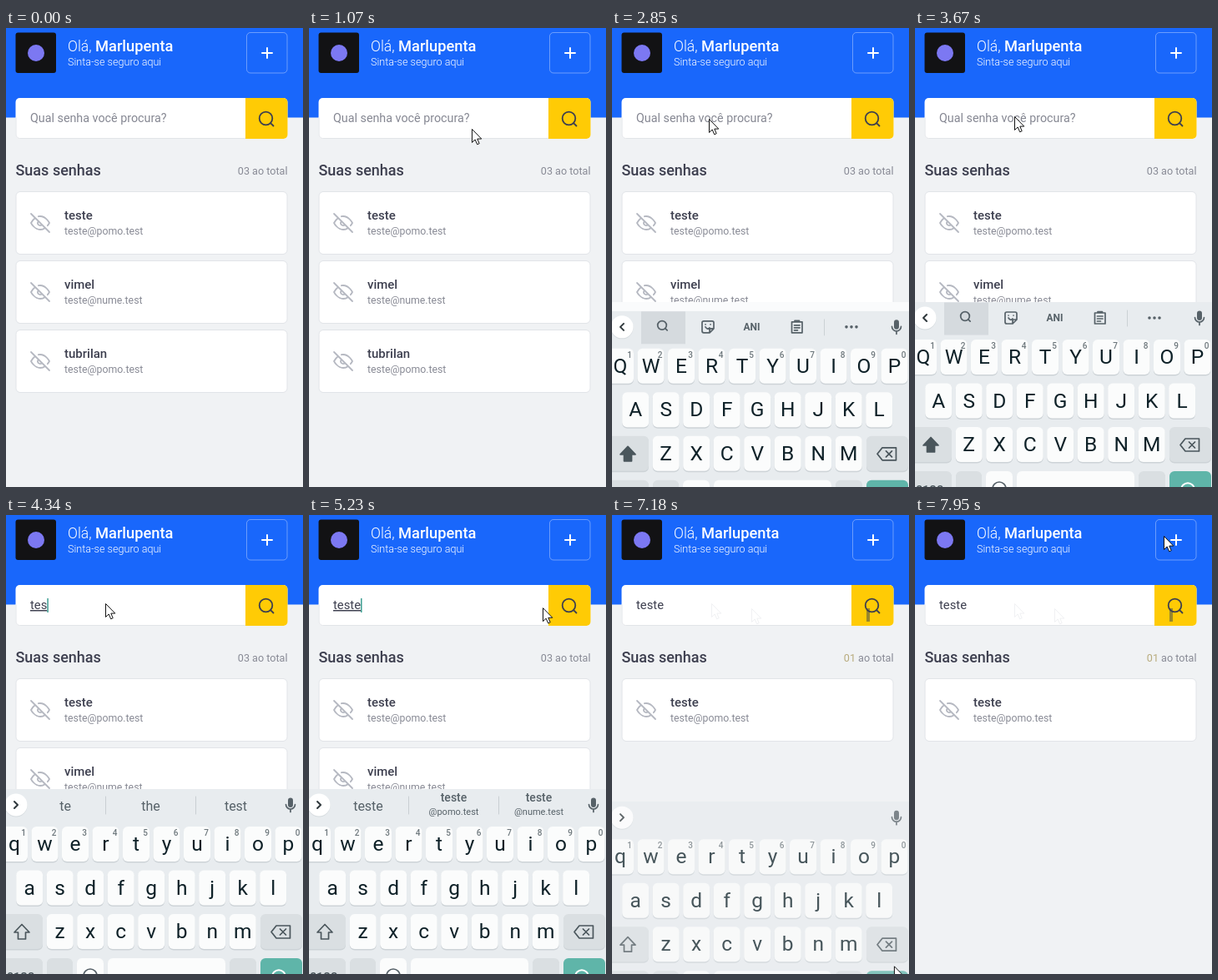
An HTML page for the animation above (8000 ms loop, 356 by 551 pixels).

```html
<!DOCTYPE html>
<html lang="pt">
<head>
<meta charset="utf-8">
<title>Senhas</title>
<style>
html, body { margin: 0; width: 100%; height: 100%; overflow: hidden; background: #f0f2f4; }
svg { display: block; width: 100%; height: 100%; }
text { font-family: Roboto, sans-serif; white-space: pre; }
.line { fill: none; stroke-linecap: round; stroke-linejoin: round; }
.mid { text-anchor: middle; }
.bold { font-weight: 500; }
.thin { font-weight: 300; }
#typed { text-decoration-color: #8d9097; text-decoration-thickness: 1px; }
</style>
</head>
<body>
<svg viewBox="0 0 356 551">
  <defs>
    <path id="arrow" d="M.5 .5V16.500L4.200 13L6.700 18.800L9.200 17.700L6.800 12.100H11.800Z"/>
    <g id="lens" class="line"><circle r="7.8"/><path d="M5.6 5.6L9 9"/></g>
  </defs>
  <rect width="356" height="551" fill="#f0f2f4"/>
  <rect width="356" height="107.500" fill="#1967fb"/>
  <rect x="11.500" y="5.500" width="48.500" height="48.500" rx="3" fill="#121214"/>
  <circle cx="36" cy="30" r="10" fill="#7c78f2"/>
  <g fill="#fff">
    <text x="74" y="28" font-size="17.6" class="thin">Olá,</text>
    <text x="107" y="28" font-size="18.3" class="bold">Marlupenta</text>
    <text x="74" y="45" font-size="12.6" class="thin">Sinta-se seguro aqui</text>
  </g>
  <rect x="288.5" y="5.5" width="48.5" height="48.5" rx="4.5" fill="none" stroke="#fff" stroke-opacity=".36"/>
  <path d="M307 30h12M313 24v12" stroke="#fff" stroke-width="2" class="line"/>
  <rect x="11.500" y="84" width="326" height="49" rx="5" fill="#fff"/>
  <path d="M12 107.500V128a4.500 4.500 0 0 0 4.500 4.500H287" fill="none" stroke="#e1e4e8"/>
  <path d="M287 84H332.500a5 5 0 0 1 5 5v39a5 5 0 0 1-5 5H287Z" fill="#ffcb05"/>
  <rect id="bar" x="305" y="112" width="4" height="16" fill="#98862c"/>
  <use href="#lens" x="311.500" y="108.500" stroke="#3d3f4f" stroke-width="1.800"/>
  <g id="ghosts" fill="#fff" stroke="#f0f1f3">
    <use href="#arrow" x="119" y="106"/><use href="#arrow" x="167" y="112"/>
  </g>
  <text id="hint" x="29" y="113" font-size="14.3" fill="#858792">Qual senha você procura?</text>
  <text id="typed" x="29" y="113" font-size="14.8" fill="#3d3f4f"></text>
  <rect id="caret" y="100" width="1.500" height="17" fill="#3d9e92"/>
  <text x="11.500" y="177" font-size="18" class="bold" fill="#3d3f4f">Suas senhas</text>
  <text x="337.500" y="175.500" font-size="12.6" text-anchor="end" fill="#888a95"><tspan id="count">03</tspan> ao total</text>
  <g id="cards"></g>
  <rect id="panel" y="329" width="356" height="222" fill="#fafbfc"/>
  <g id="board"></g>
  <use id="mouse" href="#arrow" fill="#fff" stroke="#111" stroke-linejoin="round"/>
</svg>
<script>
const $ = id => document.getElementById(id);
const NS = 'http://www.w3.org/2000/svg';

function add(parent, tag, attrs, text) {
  const el = document.createElementNS(NS, tag);
  for (const k in attrs) el.setAttribute(k, attrs[k]);
  if (text) el.textContent = text;
  parent.appendChild(el);
  return el;
}
const show = (el, on) => el.setAttribute('visibility', on ? 'visible' : 'hidden');

// Password cards
const EYE = 'M17.940 17.940A10.070 10.070 0 0 1 12 20c-7 0-11-8-11-8a18.450 18.450 0 0 1 5.060-5.940' +
  'M9.900 4.240A9.120 9.120 0 0 1 12 4c7 0 11 8 11 8a18.500 18.500 0 0 1-2.160 3.190' +
  'm-6.720-1.070a3 3 0 1 1-4.240-4.240M1 1l22 22';
const MAIL = '@pomo.test', MAIL2 = '@nume.test';
const cards = [['teste', MAIL], ['vimel', MAIL2], ['tubrilan', MAIL]].map(([name, mail], i) => {
  const g = add($('cards'), 'g', { transform: `translate(0 ${i * 83})` });
  add(g, 'rect', { x: 12, y: 196.5, width: 325, height: 75, rx: 5, fill: '#fff', stroke: '#e1e4e8' });
  add(g, 'path', { d: EYE, transform: 'translate(29 222)', class: 'line', stroke: '#b5b8c1', 'stroke-width': 1.8 });
  add(g, 'text', { x: 70, y: 229.5, 'font-size': 15, class: 'bold', fill: '#3d3f4f' }, name);
  add(g, 'text', { x: 70, y: 248, 'font-size': 12.3, fill: '#888a95' }, 'teste' + mail);
  return g;
});

// Keyboard
const board = $('board'), INK = '#0e2128', SOFT = '#566168', GRAY = '#dadfe2';
const letters = [];
add(board, 'rect', { y: 329, width: 356, height: 300, fill: '#e8ecef' });

function key(x, y, w, fill) {
  add(board, 'rect', { x, y: y + 1, width: w, height: 42.5, rx: 6, fill: '#cdd3d7' });
  add(board, 'rect', { x, y, width: w, height: 42, rx: 6, fill });
}
['qwertyuiop', 'asdfghjkl', 'zxcvbnm'].forEach((row, r) => {
  const y = 374 + r * 52.5;
  [...row].forEach((ch, i) => {
    const x = [10, 28.2, 64.7][r] + i * 36.5;
    key(x - 16, y, 32, '#fbfcfc');
    letters.push(add(board, 'text', { x, y: y + 29, 'font-size': 24.5, class: 'mid', fill: INK }, ch));
    if (!r) add(board, 'text', { x: x + 11, y: y + 11, 'font-size': 10, class: 'mid bold', fill: '#6d777c' }, String((i + 1) % 10));
  });
});
key(-6, 479, 50, GRAY);
key(305, 479, 50, GRAY);
[[-6, 50, GRAY], [49, 31, GRAY], [85, 32, '#fbfcfc'], [122, 141, '#fbfcfc'], [268, 32, GRAY], [305, 50, '#5fb5a9']]
  .forEach(([x, w, fill]) => key(x, 532, w, fill));

const icon = (parent, d, color = SOFT, width = 1.7, fill = 'none') =>
  add(parent, 'path', { d, stroke: color, 'stroke-width': width, class: 'line', style: 'fill:' + fill });
const shift = icon(board, 'M19 491.500l9 9.500h-4.500v8h-9v-8H10Z', '#4a565c');
icon(board, 'M318 500.500l6-7.500h16.500v15H324ZM328.500 497l7 7m0-7l-7 7', '#4a565c');
add(board, 'text', { x: 18, y: 560, 'font-size': 15, class: 'mid bold', fill: '#4a565c' }, '?123');
add(board, 'circle', { cx: 101, cy: 553, r: 8, class: 'line', stroke: SOFT, 'stroke-width': 1.7 });
add(board, 'use', { href: '#lens', x: 327, y: 554, stroke: '#fff', 'stroke-width': 2 });
add(board, 'rect', { x: 338, y: 339.5, width: 6, height: 11.5, rx: 3, fill: SOFT });
icon(board, 'M335.500 347.500a5.500 5.500 0 0 0 11 0M341 353.500v3');

// Toolbar with icons, and the strip of word suggestions
const tools = add(board, 'g'), words = add(board, 'g');
add(tools, 'rect', { x: 35, y: 329.5, width: 53, height: 39, fill: '#d5dade' });
add(tools, 'use', { href: '#lens', transform: 'translate(60 346) scale(.68)', stroke: SOFT, 'stroke-width': 2.6 });
icon(tools, 'M110 341h10q2 0 2 2v7l-5 5h-7q-2 0-2-2v-10q0-2 2-2ZM122 350h-3q-2 0-2 2v3M112 348q2.500 4 5 1M112 345h.1M118 345h.1');
add(tools, 'text', { x: 167.5, y: 352.3, 'font-size': 12, 'font-weight': 700, class: 'mid', fill: SOFT }, 'ANI');
icon(tools, 'M215.500 342h12.500v13h-12.500ZM219 342v-1.500h5.500v1.500M218.500 346h6.500M218.500 349h6.500M218.500 352h4');
icon(tools, 'M254.500 339v19', '#cbd1d5', 1);
[281, 287, 293].forEach(cx => add(tools, 'circle', { cx, cy: 348, r: 1.8, fill: SOFT }));
icon(words, 'M119.500 338v21M227.500 338v21', '#c9cfd3', 1);
const slots = [71, 173.5, 275.5].map(x => ({
  one: add(words, 'text', { x, y: 354.5, 'font-size': 16, class: 'mid', fill: SOFT }),
  top: add(words, 'text', { x, y: 343.5, 'font-size': 14, class: 'mid bold', fill: SOFT }),
  low: add(words, 'text', { x, y: 359.5, 'font-size': 11, class: 'mid', fill: SOFT })
}));
add(board, 'circle', { cx: 12, cy: 349, r: 13.5, fill: '#d5dade' });
add(board, 'circle', { cx: 12, cy: 348, r: 13.5, fill: '#fff' });
const chevron = icon(board, '', '#30393d', 2);

// Timeline
const TYPED = [[0, ''], [3940, 't'], [4140, 'te'], [4320, 'tes'], [4600, 'test'], [4810, 'teste']];
const HINTS = [[0, 't', 'the', 'to'], [4140, 'te', 'the', 'test'], [4480, 'tes', 'test', 'yes'],
  [4650, 'test', 'teste', 'tests'], [4860, 'teste', 'teste|' + MAIL, 'teste|' + MAIL2]];
const CARET = [[1970, 2440], [2920, 3470], [3940, 5800], [6290, 6770]];
const PATH = [[160, 343, 545], [370, 280, 330], [580, 150, 110], [700, 95, 54], [820, 130, 80], [1000, 212, 124],
  [1070, 195, 121], [1290, 183, 116], [1490, 183, 116], [1970, 154, 111], [2300, 154, 111], [2440, 116, 109],
  [3640, 116, 109], [3670, 119, 106], [4960, 119, 106], [5100, 167, 112], [5260, 305, 111], [5600, 305, 111],
  [5800, 338, 190], [6010, 341, 272], [6290, 335, 460], [6560, 335, 460], [6770, 337, 535], [7180, 338, 542],
  [7400, 325, 400], [7600, 272, 120], [7740, 256, 42], [7950, 298, 25]];

const last = (list, t) => list.filter(e => e[0] <= t).pop();

function along(path, t) {
  const i = path.findIndex(p => p[0] > t);
  if (i < 0) return path[path.length - 1].slice(1);
  if (!i) return path[0].slice(1);
  const a = path[i - 1], b = path[i], k = (t - a[0]) / (b[0] - a[0]);
  return [1, 2].map(n => a[n] + (b[n] - a[n]) * k);
}

function drawBoard(t) {
  const on = t >= 2640 && t < 7320;
  board.setAttribute('display', on ? 'inline' : 'none');
  show($('panel'), t >= 2640 && t < 2920);
  if (!on) return;
  let dy = 0, alpha = 1;
  if (t < 2920) {
    const left = (2920 - t) / 70;
    dy = 11 * left;
    alpha = Math.min(1, 1.3 - left * .25);
  } else if (t > 7040) {
    const u = (t - 7040) / 140;
    dy = 15 * u ** 1.5;
    alpha = 1 - .25 * u * u;
  }
  board.setAttribute('transform', `translate(0 ${dy})`);
  board.setAttribute('opacity', alpha);

  const caps = t < 3940, bare = t >= 7040;
  letters.forEach(el => {
    el.textContent = caps ? el.textContent.toUpperCase() : el.textContent.toLowerCase();
  });
  shift.style.fill = caps ? '#4a565c' : 'none';
  tools.setAttribute('display', caps ? 'inline' : 'none');
  words.setAttribute('display', caps || bare ? 'none' : 'inline');
  chevron.setAttribute('d', caps ? 'M14 344l-4 4l4 4' : 'M10 344l4 4l-4 4');
  const hints = last(HINTS, t);
  slots.forEach((s, i) => {
    const [a, b] = hints[i + 1].split('|');
    s.one.textContent = b ? '' : a;
    s.top.textContent = b ? a : '';
    s.low.textContent = b || '';
  });
}

function draw(t) {
  const word = last(TYPED, t)[1], found = t >= 5400;
  show($('hint'), !word);
  $('typed').textContent = word;
  $('typed').style.textDecorationLine = t < 7040 ? 'underline' : 'none';
  show($('caret'), CARET.some(([a, b]) => t >= a && t < b));
  $('caret').setAttribute('x', 29 + (word ? $('typed').getComputedTextLength() : 0));
  $('count').textContent = found ? '01' : '03';
  $('count').setAttribute('fill', found ? '#b8ab7c' : '#888a95');
  cards.forEach((c, i) => show(c, !i || !found));
  show($('ghosts'), t >= 5260);
  show($('bar'), t >= 5600);
  drawBoard(t);
  const [x, y] = along(PATH, t);
  show($('mouse'), t >= 160);
  $('mouse').setAttribute('transform', `translate(${x} ${y})`);
}

const start = performance.now();
function loop() {
  draw((performance.now() - start) % 8000);
  requestAnimationFrame(loop);
}
loop();
</script>
</body>
</html>
```
